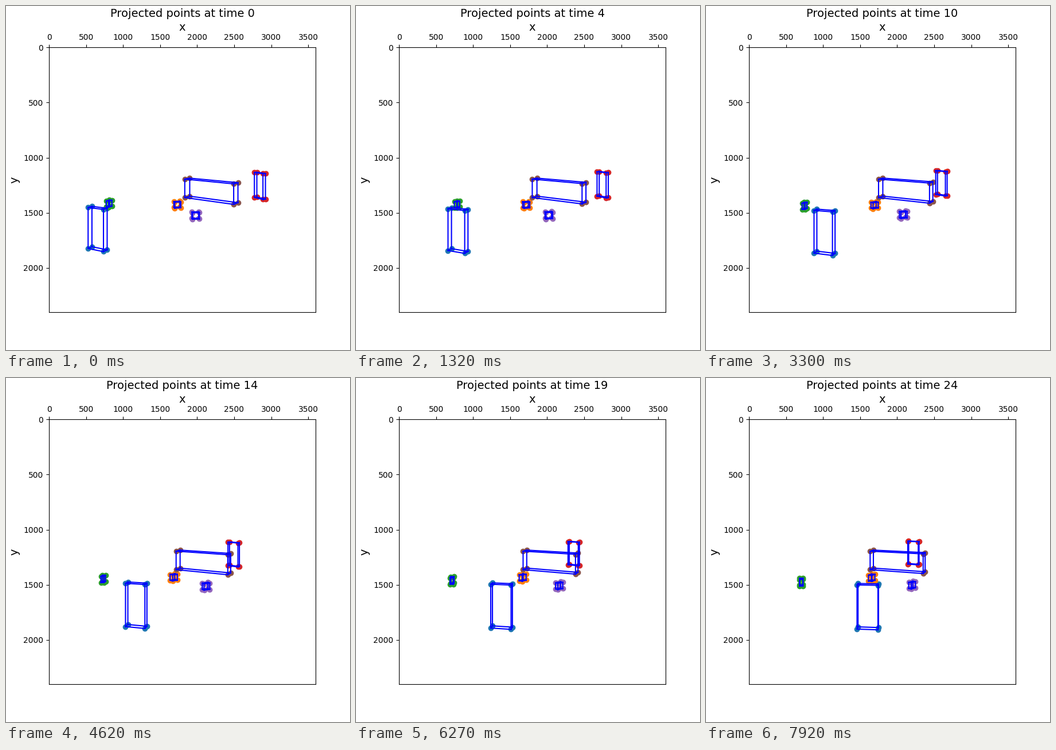
Recreate the animation shown at these times as a matplotlib script. Size 600 px wide and 600 px high, loop 8000 ms.

```python
import itertools

import matplotlib.pyplot as plt
import numpy as np
from matplotlib.animation import FuncAnimation

W, H = 3600, 2400
FOCAL, HORIZON = 4200, 810
TICK, STEP, LOOP = 40, 330, 8000
LAST = LOOP // STEP

CORNERS = np.array(list(itertools.product((0, 1), repeat=3)))
EDGES = [(i, j) for i, j in itertools.combinations(range(8), 2)
         if np.abs(CORNERS[i] - CORNERS[j]).sum() == 1]


def through(points, k):
    """Parabola through three points at k = 0, 1/2 and 1."""
    a, b, c = np.array(points)
    return a * (1 - k) * (1 - 2 * k) + b * 4 * k * (1 - k) + c * k * (2 * k - 1)


class Box:
    """A turning box on flat ground, seen by a level camera.

    path: where the middle of its base is seen; size: depth, width and
    height in camera heights; yaw: first and last angle in degrees.
    """

    def __init__(self, path, size, yaw):
        self.path, self.size, self.yaw = path, size, yaw

    def points(self, k):
        cx, cy = through(self.path, k)
        turn = np.radians(self.yaw[0] + (self.yaw[1] - self.yaw[0]) * k)
        cos, sin = np.cos(turn), np.sin(turn)
        depth, width, height = ((CORNERS - (0.5, 0.5, 0)) * self.size).T
        x = (cx - W / 2) / (cy - HORIZON) + width * cos + depth * sin
        z = FOCAL / (cy - HORIZON) - width * sin + depth * cos
        return np.column_stack([W / 2 + FOCAL * x / z,
                                HORIZON + FOCAL * (1 - height) / z])


boxes = [
    Box(path=[(656, 1829), (1098, 1872), (1605, 1894)],
        size=(0.073, 0.26, 0.367), yaw=(26, 5)),
    Box(path=[(1733, 1452), (1690, 1457), (1657, 1462)],
        size=(0.13, 0.08, 0.082), yaw=(74.5, 26.5)),
    Box(path=[(811, 1443), (741, 1469), (706, 1505)],
        size=(0.107, 0.063, 0.085), yaw=(25, -14)),
    Box(path=[(2847, 1368), (2546, 1334), (2220, 1313)],
        size=(0.081, 0.29, 0.411), yaw=(60, 22)),
    Box(path=[(1980, 1553), (2102, 1543), (2202, 1530)],
        size=(0.126, 0.06, 0.078), yaw=(82, 43.5)),
    Box(path=[(2178, 1384), (2090, 1378), (2001, 1372)],
        size=(0.216, 1.315, 0.303), yaw=(35.5, 20)),
]

fig, ax = plt.subplots(figsize=(6, 6), dpi=100)
ax.set_xlim(0, W)
ax.set_ylim(H, 0)
ax.set_yticks(range(0, 2001, 500))
ax.xaxis.tick_top()
ax.xaxis.set_label_position("top")
ax.set_xlabel("x", fontsize=14)
ax.set_ylabel("y", fontsize=14)
title = ax.set_title("", fontsize=14)

dots = [ax.scatter([0] * 8, [0] * 8, color=f"C{n}") for n in range(len(boxes))]
wires = [ax.plot([], [], color="blue")[0] for _ in boxes]


def draw(i):
    # Round up so that a step never starts late.
    step = min((i * TICK + 30) // STEP, LAST)
    for box, dot, wire in zip(boxes, dots, wires):
        pts = box.points(step / LAST)
        dot.set_offsets(pts)
        path = np.full((len(EDGES), 3, 2), np.nan)
        path[:, :2] = pts[EDGES]
        wire.set_data(*path.reshape(-1, 2).T)
    title.set_text(f"Projected points at time {step}")
    return [*dots, *wires, title]


anim = FuncAnimation(fig, draw, frames=LOOP // TICK, interval=TICK,
                     repeat=True, repeat_delay=0, blit=False)
plt.show()
```
